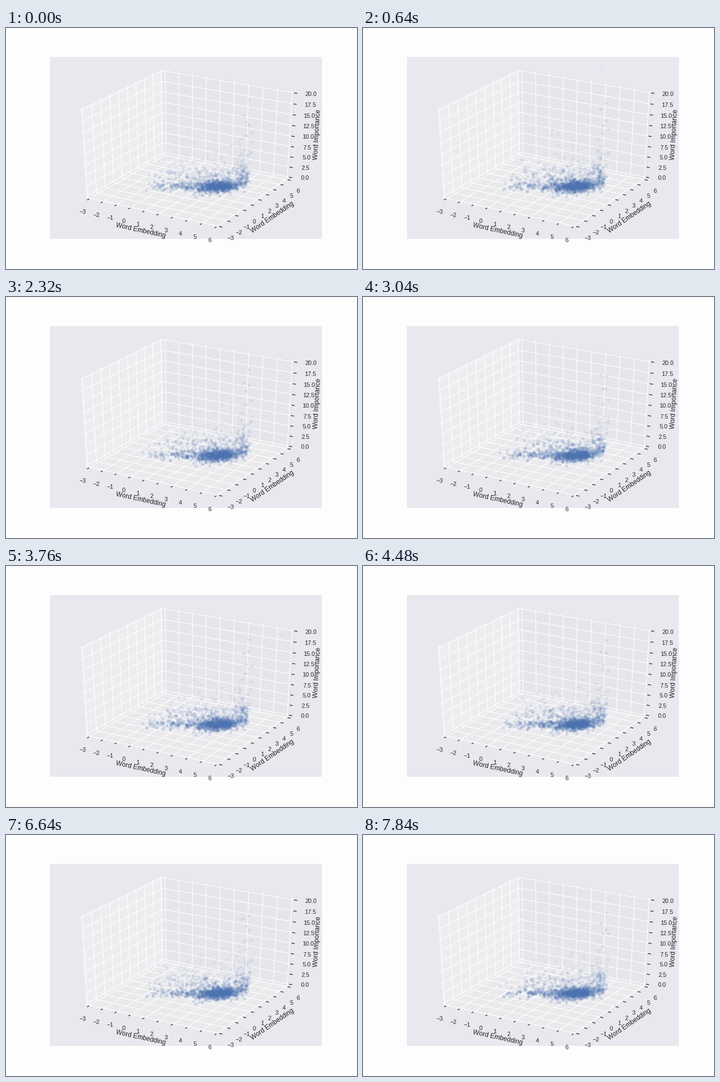
Animation, 640 px wide and 440 px high, one loop 8000 ms. Source, as a matplotlib script:

```python
import numpy as np
import matplotlib.pyplot as plt
from matplotlib.animation import FuncAnimation
from matplotlib.colors import to_rgb
from matplotlib.patches import Rectangle, Polygon

W, H, DPI = 640, 440, 100
PT = 72 / DPI                      # points per pixel
INK = "#262626"
BLUE = to_rgb("#4C72B0")
EDGE = 0.5 + 1 / 48                # pane position in the unit cube
PAD = EDGE + 0.0725                # tick label position

plt.rcParams["font.family"] = "Liberation Sans"
plt.rcParams["text.kerning_factor"] = 6
fig = plt.figure(figsize=(W / DPI, H / DPI), dpi=DPI, facecolor="#FDFDFD")
ax = fig.add_axes([0, 0, 1, 1])
ax.set_xlim(0, W)
ax.set_ylim(H, 0)
ax.axis("off")

# --- camera: azimuth -60, elevation 30, distance 10 ---
AZ, EL = np.radians(-60), np.radians(30)
EYE = np.array([np.cos(AZ) * np.cos(EL), np.sin(AZ) * np.cos(EL), np.sin(EL)])
RIGHT = np.array([-np.sin(AZ), np.cos(AZ), 0])
UP = np.cross(EYE, RIGHT)


def project(x, y, z):
    """Cube coordinates (-0.5 to 0.5) to stage pixels."""
    p = np.array([x, y, z])
    depth = 10 - p @ EYE
    sx, sy = p @ RIGHT / depth, p @ UP / depth
    return 80 + 496 * (sx + 0.095) / 0.185, 385 - 332.2 * (sy + 0.095) / 0.185


def line(points, color="white", width=1.15, order=2):
    xs, ys = zip(*(project(*p) for p in points))
    ax.plot(xs, ys, color=color, lw=width * PT, zorder=order,
            solid_capstyle="butt")


def label(x, y, text, size, angle=0):
    ax.text(x, y, text, size=size * PT, color=INK, rotation=angle,
            ha="center", va="center", zorder=6)


def pane(corners, grey):
    ax.add_patch(Polygon([project(*c) for c in corners], fc=(grey,) * 3,
                         alpha=0.5, lw=0, zorder=1))


def draw_box():
    e = EDGE
    ax.add_patch(Rectangle((80, 52.8), 496, 332.2, fc="#E8E8EF", lw=0, zorder=0))
    pane([(-e, -e, -e), (-e, e, -e), (-e, e, e), (-e, -e, e)], 0.95)
    pane([(-e, e, -e), (e, e, -e), (e, e, e), (-e, e, e)], 0.90)
    pane([(-e, -e, -e), (e, -e, -e), (e, e, -e), (-e, e, -e)], 0.925)

    inner, outer = e - 0.1 / 12, e + 0.2 / 12
    for i, t in enumerate(np.linspace(-0.5, 0.5, 10)):
        line([(t, -e, -e), (t, e, -e), (t, e, e)])
        line([(e, t, -e), (-e, t, -e), (-e, t, e)])
        line([(t, -inner, -e), (t, -outer, -e)], INK, 1.25, 5)
        line([(inner, t, -e), (outer, t, -e)], INK, 1.25, 5)
        name = str(i - 3).replace("-", "\u2212")
        x, y = project(t, -PAD, -PAD)
        label(x - 1, y + 6.6, name, 11)
        x, y = project(PAD, t, -PAD)
        label(x + 1.7, y + 6.6, name, 11)
    for i, t in enumerate(np.linspace(-0.5, 0.5, 9)):
        line([(-e, -e, t), (-e, e, t), (e, e, t)])
        line([(inner, e, t), (outer, e, t)], INK, 1.25, 5)
        x, y = project(PAD, PAD, t)
        label(x + 2.4, y + 4.2, f"{2.5 * i:.1f}", 11)

    label(245.5, 370, "Word Embedding", 12, -12.3)
    label(485.5, 345.5, "Word Embedding", 12, 34.4)
    label(567.5, 194.5, "Word Importance", 12, 86.6)


draw_box()

# --- words: floor position, typical height and chance of being shown ---
rng = np.random.default_rng(12)


def group(x, floor, height, shown):
    n = len(x)
    return np.column_stack([x, floor, rng.exponential(height, n),
                            np.full(n, shown)])


core_x = np.minimum(rng.normal(390, 20, 820), 438)
band_x = 410 - 165 * rng.beta(1.1, 2.0, 440)
loose_x = 441 - 175 * rng.beta(1.0, 1.5, 420)
edge_x = np.minimum(rng.normal(434, 6, 110), 444)
column_x = rng.uniform(424, 449, 22)
stray_x = rng.uniform(235, 395, 12)
words = np.vstack([
    group(core_x, rng.normal(291, 5.3, 820) - 0.09 * (core_x - 390), 2, 0.85),
    group(band_x, rng.normal(291.5, 4, 440), 3, 0.55),
    group(loose_x, rng.uniform(262, 293, 420) - 0.05 * (loose_x - 350), 9, 0.55),
    group(edge_x, rng.uniform(258, 288, 110), 11, 0.6),
    group(column_x, rng.uniform(215, 255, 22), 8, 0.7),
    group(stray_x, rng.normal(255, 9, 12) - 0.14 * (stray_x - 235), 3, 0.5),
])

# the most important words stand in a narrow column
BASE = 272
HEAD_X = np.array([443.3, 433.3, 443, 438, 448, 437.5])
HEAD_HEIGHT = np.array([133, 116, 104, 97, 83, 78])

total = len(words) + len(HEAD_X)
dots = ax.scatter(np.zeros(total), np.zeros(total),
                  s=(5.4 * PT) ** 2, lw=0, zorder=4)


def update(n):
    step = (n + 1) // 3            # a new batch every 240 ms
    r = np.random.default_rng(500 + step)
    x, floor, height, chance = words.T
    y = floor - height * r.lognormal(0, 0.4, len(words))
    shade = 0.06 + 0.12 * np.clip((y - 240) / 50, 0, 1)
    alpha = np.where(r.random(len(words)) < chance, shade, 0)
    head = BASE - HEAD_HEIGHT * r.normal(1, 0.06, len(HEAD_X))

    dots.set_offsets(np.column_stack([np.r_[x, HEAD_X], np.r_[y, head]]))
    rgba = np.empty((total, 4))
    rgba[:, :3] = BLUE
    rgba[:, 3] = np.r_[alpha, np.full(len(HEAD_X), 0.12)]
    dots.set_facecolors(rgba)
    return dots,


anim = FuncAnimation(fig, update, frames=100, interval=80, repeat=True,
                     repeat_delay=0, init_func=lambda: update(0))
plt.show()
```
